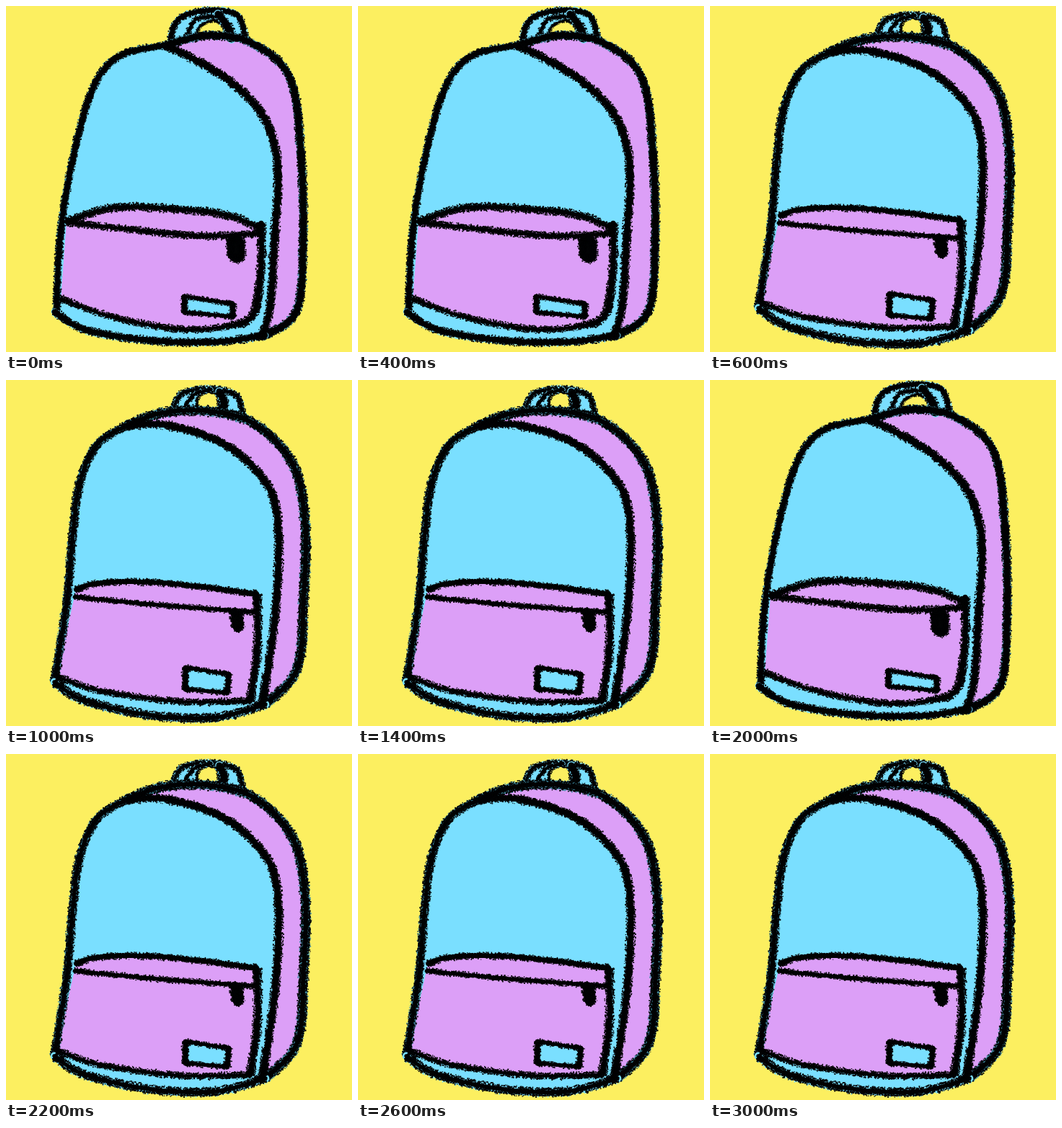
Recreate the animation shown at these times as an HTML page with a canvas. Size 480 px wide and 480 px high, loop 3200 ms.

```html
<!DOCTYPE html>
<html lang="en">
<head>
<meta charset="utf-8">
<title>Backpack</title>
<style>
html, body { margin: 0; width: 100%; height: 100%; overflow: hidden; background: #fcef60; }
canvas { display: block; width: 480px; height: 480px; }
</style>
</head>
<body>
<canvas id="stage" width="480" height="480"></canvas>
<script>
const SIZE = 480, STEP = 200;
const YELLOW = '#fcef60', CYAN = '#7adfff', PINK = '#dc9ff7', BLACK = '#020304', TEAL = '#3f8ca3';

// Key points of each curve, as "x,y x,y ..."
const poseA = {
  seed: 11,
  left: '222,54 160,68 125,105 100,180 80,280 73,350 70,422',
  bottom: '67,424 110,449 200,464 290,466 360,457',
  side: '360,457 402,425 412,340 409,200 393,98 340,51 280,41 222,54',
  front: '222,54 305,100 358,155 377,225 372,330 366,420 354,460',
  top: '84,299 150,280 240,282 310,291 355,310',
  zip: '84,300 200,313 280,319 355,315',
  right: '354,301 354,360 345,424 325,441',
  low: '76,406 150,432 250,449 325,441',
  handle: '228,45 241,17 282,6 321,13 332,44',
  hole: '263,44 269,29 288,20 303,30 307,46',
  inner: '250,43 263,19 290,14',
  strap: '294,11 307,28 313,46',
  tag: '247,403 314,413 315,431 248,425',
  pull: '311,324 325,325 326,349 313,348',
  outline: 10, outlineGrain: .3, pocket: 10.5, pocketGrain: .5
};

const poseB = {
  seed: 47,
  left: '168,63 128,88 103,140 92,220 84,310 67,419',
  bottom: '67,419 110,445 200,465 290,468 360,450',
  side: '360,450 404,400 413,300 415,200 398,117 345,61 280,43 215,46 168,63',
  front: '168,63 225,63 305,90 362,145 378,210 373,330 355,452',
  top: '97,291 135,281 225,282 348,297',
  zip: '95,301 210,312 345,322',
  right: '348,297 349,370 339,445',
  low: '70,411 130,431 240,446 339,445',
  handle: '232,42 244,19 285,12 320,22 328,49',
  hole: '265,39 267,23 280,16 293,22 296,41',
  inner: '247,41 260,21 285,13',
  strap: '296,16 302,30 300,45',
  tag: '249,399 309,408 307,434 249,429',
  pull: '316,323 323,323 325,343 319,344',
  outline: 12, outlineGrain: .55, pocket: 8, pocketGrain: .25
};

function random(seed) {
  return () => {
    seed = (seed + 0x6d2b79f5) | 0;
    let t = Math.imul(seed ^ (seed >>> 15), seed | 1);
    t ^= t + Math.imul(t ^ (t >>> 7), t | 61);
    return ((t ^ (t >>> 14)) >>> 0) / 4294967296;
  };
}

const parse = text => text.split(' ').map(p => p.split(',').map(Number));

function spline(a, b, c, d, t) {
  const slope = c - a;
  const bend = 2 * a - 5 * b + 4 * c - d;
  const twist = 3 * (b - c) + d - a;
  return b + t / 2 * (slope + t * (bend + t * twist));
}

// Catmull-Rom curve sampled roughly once per pixel
function smooth(pts) {
  const out = [], last = pts.length - 1;
  for (let i = 0; i < last; i++) {
    const a = pts[Math.max(0, i - 1)], b = pts[i], c = pts[i + 1], d = pts[Math.min(last, i + 2)];
    const n = Math.max(2, Math.round(Math.hypot(c[0] - b[0], c[1] - b[1])));
    for (let k = 0; k < n; k++) {
      out.push([0, 1].map(j => spline(a[j], b[j], c[j], d[j], k / n)));
    }
  }
  out.push(pts[last]);
  return out;
}

function render(pose) {
  const canvas = document.createElement('canvas');
  canvas.width = canvas.height = SIZE;
  const g = canvas.getContext('2d');
  const rnd = random(pose.seed);
  const curve = name => smooth(parse(pose[name]));
  const back = name => curve(name).reverse();

  function trace(pts) {
    g.beginPath();
    pts.forEach(p => g.lineTo(p[0], p[1]));
  }

  function fill(pts, color) {
    trace(pts);
    g.closePath();
    g.fillStyle = color;
    g.fill();
  }

  function line(pts, width, color) {
    g.lineCap = g.lineJoin = 'round';
    trace(pts);
    g.strokeStyle = color;
    g.lineWidth = width;
    g.stroke();
  }

  function specks(pts, width, perPixel, color, max) {
    g.fillStyle = color;
    pts.forEach((p, i) => {
      const q = pts[Math.min(i + 1, pts.length - 1)], o = pts[Math.max(i - 1, 0)];
      const dx = q[0] - o[0], dy = q[1] - o[1], len = Math.hypot(dx, dy) || 1;
      for (let n = perPixel; n > 0; n--) {
        if (rnd() > n) continue;
        const u = (rnd() - .5) * width, s = 1 + rnd() * (max - 1);
        g.fillRect(p[0] - dy / len * u - s / 2, p[1] + dx / len * u - s / 2, s, s);
      }
    });
  }

  // A solid core with loose specks; "under" shows through the grain
  function crayon(pts, width, grain, under) {
    if (under) {
      line(pts, width * .9, under);
      specks(pts, width + 2, 2, under, 2);
    }
    line(pts, width * (1 - grain), BLACK);
    specks(pts, width * .92, width * .42, BLACK, 2.4);
    specks(pts, width + 2.5, 2, BLACK, 2);
  }

  g.fillStyle = YELLOW;
  g.fillRect(0, 0, SIZE, SIZE);

  fill(curve('handle'), CYAN);
  fill(curve('hole'), YELLOW);
  fill([...curve('left'), ...curve('bottom'), ...curve('side')], PINK);
  fill([...curve('left'), ...curve('bottom'), ...back('front')], CYAN);
  fill([...curve('top'), ...curve('right'), ...back('low')], PINK);

  const { outline, outlineGrain, pocket, pocketGrain } = pose;
  crayon(curve('hole'), 3, .3);
  crayon(curve('handle'), 8, outlineGrain, CYAN);
  crayon(curve('inner'), 6, .4, CYAN);
  crayon(curve('strap'), 13, .3, CYAN);
  crayon(curve('side'), outline + 1, outlineGrain, TEAL);
  crayon(curve('left'), outline - 1, outlineGrain, TEAL);
  crayon(curve('bottom'), outline, outlineGrain, CYAN);
  crayon(curve('front'), 11.5, .35);
  crayon(curve('top'), pocket, pocketGrain);
  crayon(curve('zip'), pocket - 1.5, pocketGrain);
  crayon(curve('right'), 12, .45);
  crayon(curve('low'), 8.5, .55);

  const tag = parse(pose.tag);
  fill(tag, CYAN);
  tag.forEach((p, i) => crayon(smooth([p, tag[(i + 1) % 4]]), i % 2 ? 9 : 6, .25));

  const pull = parse(pose.pull);
  fill(pull, BLACK);
  crayon(smooth([...pull, pull[0]]), 11, .3);
  return canvas;
}

const frames = [poseA, poseB].map(render);
const ctx = document.getElementById('stage').getContext('2d');

function draw(now) {
  ctx.drawImage(frames[Math.floor(Math.max(0, now) / STEP) % 2], 0, 0);
  requestAnimationFrame(draw);
}
draw(performance.now());
</script>
</body>
</html>
```
